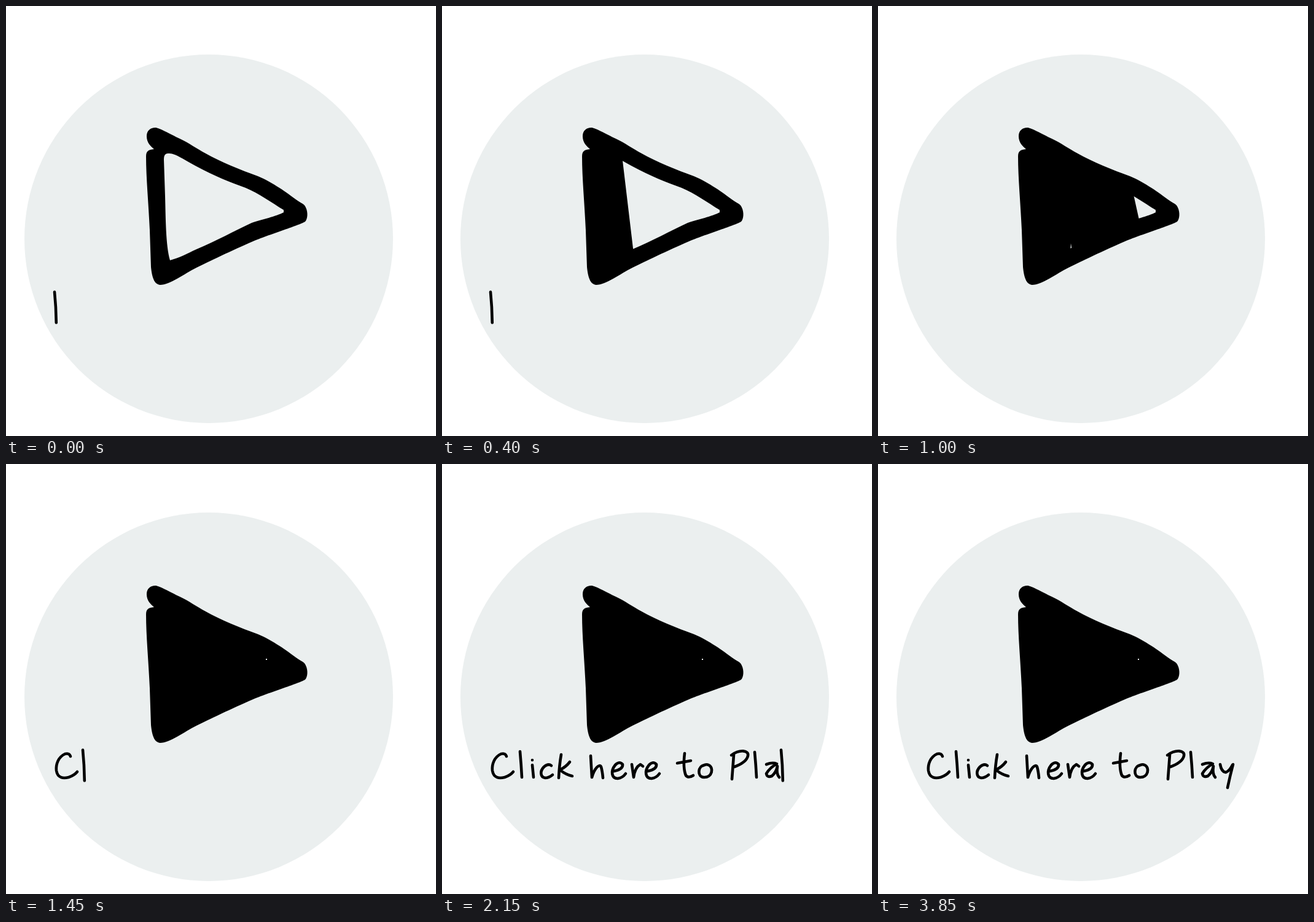
Write an HTML page with a canvas that moves like this. It is 700x700 px and loops after 4000 ms.

```html
<!DOCTYPE html>
<html lang="en">
<head>
<meta charset="utf-8">
<title>Click here to Play</title>
<style>
  html, body { margin: 0; width: 100%; height: 100%; overflow: hidden; background: #fff; }
  canvas { display: block; width: 700px; height: 700px; }
</style>
</head>
<body>
<canvas id="stage" width="700" height="700" role="img" aria-label="Click here to Play"></canvas>
<script>
const ctx = document.getElementById('stage').getContext('2d');
const LOOP = 4000, STEP = 50, TYPE_START = 1450, BLINK_START = 2250;
const INK = '#000', DISC = '#ebefef';

const outer = new Path2D(
  'M229 212 C229 203 235 198 243 198 C249 198 266 208 283 216 C298 223 310 232 325 240' +
  ' C350 254 382 267 410 277 C434 287 459 305 472 315 C480 321 486 322 488 328' +
  ' C492 336 491 347 487 351 C480 356 420 375 400 384 C370 397 328 417 310 426' +
  ' C290 436 267 454 251 454 C242 453 238 444 236 425 L234 365 C232 320 228 280 228 245' +
  ' C228 236 232 234 241 233 C235 228 229 222 229 212 Z');
const inner = new Path2D(
  'M257 250 C257 241 260 240 266 240 C276 240 293 252 310 261 C340 277 365 287 390 296' +
  ' C412 305 432 320 452 332 L452 336 C441 342 415 348 400 353 C370 367 345 381 310 396' +
  ' C295 403 282 410 267 414 C260 390 260 345 259 310 Z');

// Brush route in three legs: points and the number of steps each takes.
const legs = [
  { steps: 8, pts: [[264, 240], [276, 412], [278, 240], [298, 408]] },
  { steps: 7, pts: [[298, 408], [308, 256], [330, 395], [334, 272], [343, 275], [350, 320]] },
  { steps: 6, pts: [[350, 320], [356, 385], [372, 285], [386, 370], [400, 302],
                    [412, 356], [426, 318], [446, 338]] }
];
const FILL_STEPS = legs.reduce((sum, leg) => sum + leg.steps, 0);

// Each token: pen strokes, the cursor position after typing it, and an offset.
const E = 'M280 500 Q295 497 294 489 Q289 483 282 490 C274 500 276 512 286 512 Q294 511 299 504';
const tokens = [
  ['M105 476 Q103 470 96 472 C85 477 81 489 82 499 C84 512 94 512 102 510 Q111 507 116 501', 125],
  ['M127 468 Q129 490 130 510', 137],
  ['M147 490 L149 510 M147 482 L147 482', 156],
  ['M178 491 Q173 487 166 493 C159 500 160 510 168 511 Q174 511 180 506', 187],
  ['M194 473 Q191 490 190 511 M208 485 Q202 493 192 498 Q202 506 212 508', 219],
  ['', 232],
  ['M242 475 L244 510 C248 496 256 487 259 493 Q261 500 262 511', 270],
  [E, 305],
  ['M309 489 L312 510 Q314 494 323 489 L327 492', 333],
  [E, 360, 55],
  ['M395 471 Q392 495 397 507 Q401 512 409 507 M383 487 L405 483', 407],
  ['M428 490 C416 491 415 509 426 510 C440 511 443 494 434 490 Q430 488 425 491', 447],
  ['M475 473 L472 513 M471 474 C485 464 500 466 498 475 C496 485 484 490 476 493', 505],
  ['M509 469 Q511 490 512 510', 521],
  ['M528 489 Q538 485 545 488 Q534 494 528 504 Q529 511 537 508 Q544 502 546 492 Q544 505 549 510', 552],
  ['M557 489 Q559 501 566 502 Q572 500 577 490 M578 489 Q573 508 569 527', 590]
].map(([d, caret, dx = 0]) => ({ path: new Path2D(d), caret, dx }));

function strokeRoute(pts, share) {
  const dist = i => Math.hypot(pts[i][0] - pts[i - 1][0], pts[i][1] - pts[i - 1][1]);
  let left = share * pts.slice(1).reduce((sum, _, i) => sum + dist(i + 1), 0);
  ctx.beginPath();
  ctx.moveTo(...pts[0]);
  for (let i = 1; i < pts.length && left > 0; i++) {
    const k = Math.min(1, left / dist(i));
    const [x, y] = pts[i - 1];
    ctx.lineTo(x + (pts[i][0] - x) * k, y + (pts[i][1] - y) * k);
    left -= dist(i);
  }
  ctx.stroke();
}

function drawTriangle(step) {
  ctx.fillStyle = INK;
  ctx.fill(outer);
  if (step >= FILL_STEPS) {
    ctx.fillStyle = DISC;
    ctx.fillRect(423, 317, 2, 2);
    return;
  }
  ctx.fillStyle = DISC;
  ctx.fill(inner);
  ctx.save();
  ctx.clip(outer);
  ctx.lineWidth = 29;
  for (const leg of legs) {
    if (step <= 0) break;
    strokeRoute(leg.pts, Math.min(1, step / leg.steps));
    step -= leg.steps;
  }
  ctx.restore();
}

function drawText(count) {
  ctx.lineWidth = 4.6;
  for (const { path, dx } of tokens.slice(0, count)) {
    ctx.save();
    ctx.translate(dx, 0);
    ctx.stroke(path);
    ctx.restore();
  }
}

function drawCaret(x) {
  ctx.lineWidth = 4.6;
  ctx.beginPath();
  ctx.moveTo(x, 465.5);
  ctx.quadraticCurveTo(x + 2.5, 490, x + 2.8, 515.5);
  ctx.stroke();
}

function caretOn(t) {
  if (t < TYPE_START) return t < 600 || t >= 1200;
  return t < BLINK_START || Math.floor((t - BLINK_START) / 200) % 2 === 1;
}

function draw(t) {
  ctx.fillStyle = '#fff';
  ctx.fillRect(0, 0, 700, 700);
  ctx.fillStyle = DISC;
  ctx.beginPath();
  ctx.arc(330, 379, 300, 0, Math.PI * 2);
  ctx.fill();

  ctx.strokeStyle = INK;
  ctx.lineCap = ctx.lineJoin = 'round';
  drawTriangle(Math.floor(t / STEP));

  const typed = Math.floor((t - TYPE_START) / STEP) + 1;
  const count = Math.max(0, Math.min(tokens.length, typed));
  drawText(count);
  if (caretOn(t)) drawCaret(count ? tokens[count - 1].caret : 79);
}

const start = performance.now();
function tick() {
  draw((performance.now() - start) % LOOP);
  requestAnimationFrame(tick);
}
tick();
</script>
</body>
</html>
```
